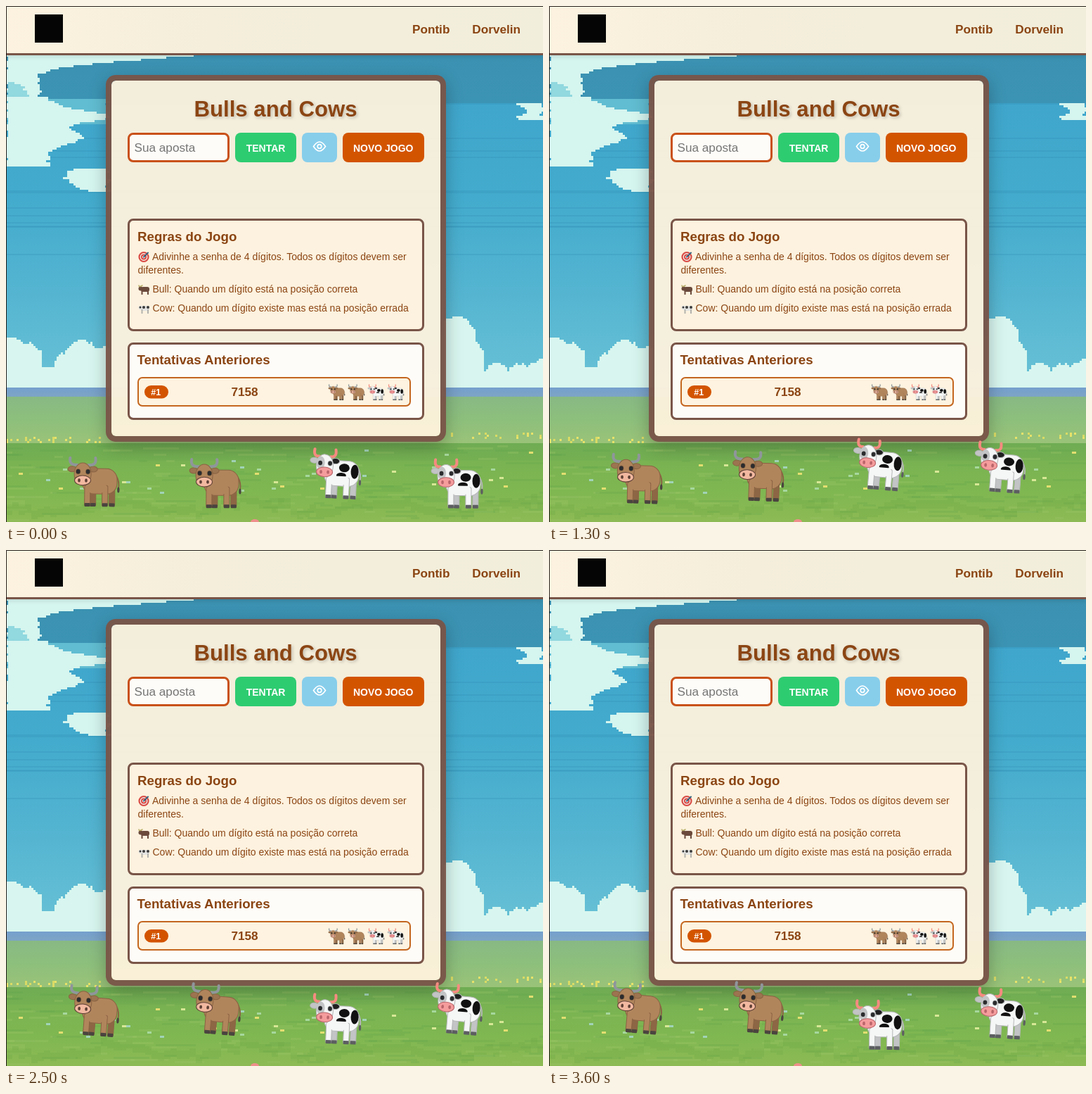
An HTML page with a canvas for the animation above (3.7 s loop, 764 by 733 pixels).

```html
<!DOCTYPE html>
<html lang="pt">
<head>
<meta charset="utf-8">
<title>Bulls and Cows</title>
<style>
  html, body { margin: 0; width: 764px; height: 733px; overflow: hidden; }
  body { position: relative; font-family: "Liberation Sans", Arial, sans-serif; }
  canvas, svg, header, main { position: absolute; left: 0; top: 0; box-sizing: border-box; }
  header { width: 764px; height: 70px; background: linear-gradient(90deg, #fcf2df, #f4eedb 38%, #f1eedb); border-bottom: 3px solid #795548; box-shadow: 0 2px 6px rgba(0,0,0,.12); }
  main { left: 142px; top: 98px; width: 484px; height: 521px; border: 8px solid rgba(121,85,72,.96); border-radius: 14px;
    background: rgba(255,243,222,.94); background-clip: padding-box; box-shadow: 0 8px 24px rgba(0,0,0,.25); }
  text { fill: #8b4513; font-size: 14px; }
  .b { font-weight: 700; }
  .mid { text-anchor: middle; }
  .end { text-anchor: end; }
  .big { font-size: 17.16px; }
  .h1 { font-size: 31.2px; filter: drop-shadow(2px 2px 2px rgba(0,0,0,.2)); }
  .h2 { font-size: 18.72px; }
  .tag { font-size: 12.48px; }
  .w { fill: #fff; }
  .hint { fill: #757575; }
  .panel { stroke: #795548; stroke-width: 3; }
  .line { fill: none; stroke-linecap: round; }
</style>
</head>
<body>
<canvas width="764" height="733"></canvas>
<header></header>
<main></main>
<svg width="764" height="733">
  <defs>
    <g id="bull"></g>
    <g id="cow"></g>
    <g id="side">
      <rect x="4" y="4" width="12" height="7" rx="3"/>
      <circle cx="3.5" cy="6.5" r="3"/>
      <path d="M5.500 9v6M14 9v6" stroke="currentColor" stroke-width="2"/>
    </g>
  </defs>

  <path d="M.5 733V.5H764" fill="none" stroke="#25211d"/>
  <rect x="41" y="12" width="40" height="40" fill="#050505"/>
  <text class="b big" x="578" y="39">Pontib</text>
  <text class="b big end" x="732" y="39">Dorvelin</text>

  <text class="b h1 mid" x="383.5" y="157">Bulls and Cows</text>
  <rect x="174.5" y="181.5" width="142" height="39" rx="6.5" fill="#fdfcf8" stroke="#c9511a" stroke-width="3"/>
  <text class="big hint" x="182.5" y="207">Sua aposta</text>
  <rect x="326" y="180" width="87" height="42" rx="8" fill="#2ecc71"/>
  <text class="b w mid" x="369.5" y="206.5">TENTAR</text>
  <rect x="421" y="180" width="50" height="42" rx="8" fill="#87ceeb"/>
  <g fill="none" stroke="#fff" stroke-width="1.7">
    <path d="M437.5 199.5Q446 186.5 454.5 199.5Q446 212.5 437.5 199.5Z"/><circle cx="446" cy="199.5" r="2.8"/>
  </g>
  <rect x="479" y="180" width="116" height="42" rx="8" fill="#d35400"/>
  <text class="b w mid" x="536.7" y="206.5">NOVO JOGO</text>

  <rect class="panel" x="174.5" y="303.5" width="419" height="157" rx="6.5" fill="#fdf2df"/>
  <text class="b h2" x="187" y="334">Regras do Jogo</text>
  <text x="208" y="361">Adivinhe a senha de 4 dígitos. Todos os dígitos devem ser</text>
  <text x="187.5" y="380">diferentes.</text>
  <text x="208.5" y="407">Bull: Quando um dígito está na posição correta</text>
  <text x="208.5" y="434">Cow: Quando um dígito existe mas está na posição errada</text>
  <circle cx="196" cy="356.5" r="6.5" fill="#f4eee8" stroke="#d94b45" stroke-width="2.2"/>
  <circle cx="196" cy="356.5" r="3" fill="#f4eee8" stroke="#d94b45" stroke-width="2"/>
  <path class="line" d="M196 356.5l6-6" stroke="#37627f" stroke-width="2"/>
  <use href="#side" x="188" y="395" fill="#6b4a3c" color="#6b4a3c"/>
  <path class="line" d="M189 397q0 3 5 0" stroke="#b7ad68" stroke-width="1.5"/>
  <use href="#side" x="188" y="422" fill="#e4e5e3" color="#b4b3ae"/>
  <g fill="#3c3c3c"><circle cx="191" cy="428" r="1.5"/><circle cx="196" cy="428" r="2"/><circle cx="202" cy="428" r="2"/></g>

  <rect class="panel" x="174.5" y="479.5" width="419" height="107" rx="6.5" fill="#fefcf8"/>
  <text class="b h2" x="186.5" y="509">Tentativas Anteriores</text>
  <rect x="188" y="528" width="387" height="40" rx="6" fill="#fdf3e0" stroke="#c4661f" stroke-width="2"/>
  <rect x="197" y="539" width="34" height="18.5" rx="9.25" fill="#d35400"/>
  <text class="b w mid tag" x="213.3" y="553">#1</text>
  <text class="b big" x="320.5" y="554">7158</text>
  <g id="score"></g>
  <g id="herd"></g>
</svg>
<script>
const byId = id => document.getElementById(id);
const ctx = document.querySelector('canvas').getContext('2d');
const CELL = 3;

let seed = 7;
const rnd = () => (seed = seed * 16807 % 2147483647) / 2147483647;
const between = (a, b) => a + rnd() * (b - a);
const pick = list => list[Math.floor(rnd() * list.length)];
const snap = v => Math.round(v / CELL) * CELL;
const hump = (v, mid, width) => Math.exp(-(((v - mid) / width) ** 2));

function rect(color, x, y, w, h) {
  ctx.fillStyle = color;
  ctx.fillRect(x, y, w, h);
}

function fade(y0, y1, ...colors) {
  const g = ctx.createLinearGradient(0, y0, 0, y1);
  colors.forEach((c, i) => g.addColorStop(i / (colors.length - 1), c));
  rect(g, 0, y0, 764, y1 - y0);
}

// Stack of rows whose ends follow two functions of y, roughened and stepped
function wisp(color, y0, y1, left, right) {
  for (let y = y0; y < y1; y += CELL) {
    const x = snap(left(y) + between(-4, 4));
    rect(color, x, y, snap(right(y) + between(-4, 4)) - x, CELL);
  }
}

// Row of round puffs [x, y, r] on a flat bank
function puffs(color, x0, x1, base, list) {
  for (let x = x0; x < x1; x += CELL) {
    const tops = list.map(([cx, cy, r]) => Math.abs(x - cx) < r ? cy - Math.sqrt(r * r - (x - cx) ** 2) : base);
    const y = snap(Math.min(base, ...tops) + between(-2, 2));
    rect(color, x, y, CELL, 543 - y);
  }
}

function flecks(n, x0, x1, y0, y1, colors, w) {
  for (let i = 0; i < n; i++) rect(pick(colors), snap(between(x0, x1)), snap(between(y0, y1)), w, CELL);
}

function sky() {
  const pale = '#d5f5ef', edge = () => 0, far = () => 764;
  fade(0, 140, '#3a8eae', '#3c94b4');
  fade(138, 545, '#40a6cc', '#43abcd', '#55b5d1', '#69c2d6');
  for (let i = 0; i < 12; i++) rect('rgba(42,132,175,.22)', 0, Math.round(between(138, 370)), 764, 2);

  wisp('#61bdd2', 132, 168, edge, () => 145);
  wisp(pale, 69, 129, edge, y => 48 + 207 * Math.max(0, (98 - y) / 28) ** 2);
  wisp(pale, 129, 228, edge, y => 60 + 84 * hump(y, 155, 12) + 50 * hump(y, 184, 13));
  wisp('#91d8df', 108, 129, edge, y => y - 92);
  wisp(pale, 231, 264, y => 84 + 40 * ((y - 241) / 23) ** 2, () => 145);
  wisp(pale, 138, 162, y => 726 + 14 * Math.abs(Math.sin((y - 138) / 6)), far);
}

function clouds() {
  const white = '#d8f6ef';
  puffs(white, 0, 145, 514, [[8, 490, 19], [28, 502, 23], [106, 498, 23], [84, 510, 17], [138, 505, 20]]);
  puffs(white, 623, 764, 517, [[638, 472, 30], [660, 494, 18], [697, 524, 17], [728, 526, 18], [758, 524, 21]]);
}

function field() {
  fade(542, 555, '#759fcd', '#7da5c5');
  fade(555, 621, '#88b984', '#8dbf7c', '#9ac378');
  fade(621, 646, '#6fac53', '#75b052');
  fade(646, 733, '#79b352', '#7fb751', '#8dba54');
  const tint = ['rgba(158,198,104,.28)', 'rgba(92,158,76,.22)'];
  for (let i = 0; i < 160; i++) rect(pick(tint), snap(between(-30, 760)), snap(between(624, 730)), snap(between(9, 60)), CELL);
  for (let x = 0; x < 764; x += 9) rect('rgba(104,164,66,.25)', x, snap(706 + 8 * Math.sin(x / 31) + between(-6, 6)), 9, 12);
  const yellow = ['#d9db65', '#e7e26a'];
  flecks(26, 1, 140, 611, 619, yellow, 3);
  flecks(18, 628, 762, 605, 613, yellow, 3);
  flecks(40, 4, 760, 628, 692, ['#a6d79d', '#d7e795', '#e2de70', '#a1d3b7'], 6);
  ctx.fillStyle = '#ee8f8b';
  ctx.beginPath();
  ctx.ellipse(354, 733, 6, 4, 0, 0, 7);
  ctx.fill();
}

const oval = (x, y, rx, ry, fill, line = 'none') =>
  `<ellipse cx="${x}" cy="${y}" rx="${rx}" ry="${ry}" fill="${fill}" stroke="${line}"/>`;
const stroke = (d, color, width) => `<path class="line" d="${d}" stroke="${color}" stroke-width="${width}"/>`;
const box = (x, y, w, h, r, fill, line = 'none') =>
  `<rect x="${x}" y="${y}" width="${w}" height="${h}" rx="${r}" fill="${fill}" stroke="${line}"/>`;
const pair = part => part(-1) + part(1);

// Standing animal in a 72 by 72 box, head on the left
function beast({ hide, shade, line, hoof, ears, horn, reach, muzzle, rim, spots, blaze }) {
  const leg = (x, fill) => box(x, 42, 8, 29, 2, fill, line) + box(x, 67, 8, 5, 1, hoof);
  return stroke('M67 27Q73 36 71 46', line, 2) + oval(71, 48, 1.7, 4, hoof)
    + leg(31, shade) + leg(58, shade)
    + box(20, 18, 49, 36, 15, hide, line) + spots
    + leg(23, hide) + leg(48, hide) + box(24, 40, 31, 12, 5, hide)
    + pair(s => oval(20 + s * 15, 19, 6, 4, ears[(s + 1) / 2], line))
    + pair(s => stroke(`M${20 + s * 8} 13Q${20 + s * (reach + 2)} 14 ${20 + s * reach} 3`, horn, 4))
    + oval(20, 26, 12, 16, hide, line) + blaze
    + pair(s => oval(20.5 + s * 7, 22.5, 3.6, 4, shade) + oval(20.5 + s * 7, 22.5, 2.9, 3.2, '#2b2c2e'))
    + oval(20, 35, 11.5, 6.8, muzzle, rim)
    + pair(s => oval(20 + s * 5, 35, 1.9, 2.7, rim));
}

byId('bull').innerHTML = beast({
  hide: '#b1855c', shade: '#8d6745', line: '#8a6343', hoof: '#4a443f', ears: ['#9c7450', '#9c7450'],
  horn: '#8f969b', reach: 18, muzzle: '#f2b8a0', rim: '#5d3f35', spots: '', blaze: ''
});
byId('cow').innerHTML = beast({
  hide: '#f5f6f6', shade: '#c2c4c5', line: '#b4b6b7', hoof: '#5c5e60', ears: ['#c2c4c5', '#202020'],
  horn: '#f58b80', reach: 15, muzzle: '#f59c9d', rim: '#b9656a',
  spots: oval(48, 28, 7.5, 6, '#111') + oval(44, 39, 7, 4, '#111') + oval(63, 33, 5.5, 10, '#111'),
  blaze: oval(14, 22, 6, 9, '#c2c4c5')
});

sky();
clouds();
field();

const herd = [
  { kind: 'bull', x: 125, low: 120 },
  { kind: 'bull', x: 298, low: 80 },
  { kind: 'cow', x: 469, low: 740 },
  { kind: 'cow', x: 642, low: 930 }
];
byId('herd').innerHTML = herd.map(a => `<use href="#${a.kind}"/>`).join('');
byId('score').innerHTML = herd.map((a, i) =>
  `<use href="#${a.kind}" transform="translate(${459 + 28 * i} 537) scale(.32)"/>`).join('');
const nodes = [...byId('herd').children];

const LOOP = 3700, STEP = 100, PERIOD = 1000;

function draw() {
  const t = Math.floor((performance.now() + 1) % LOOP / STEP) * STEP;
  herd.forEach(({ x, low }, i) => {
    const lift = (1 - Math.cos((t - low) / PERIOD * 2 * Math.PI)) / 2;
    nodes[i].setAttribute('transform', `translate(${x} ${679 - 29 * lift}) rotate(${5 * lift}) translate(-36 -36)`);
  });
  requestAnimationFrame(draw);
}
draw();
</script>
</body>
</html>
```
